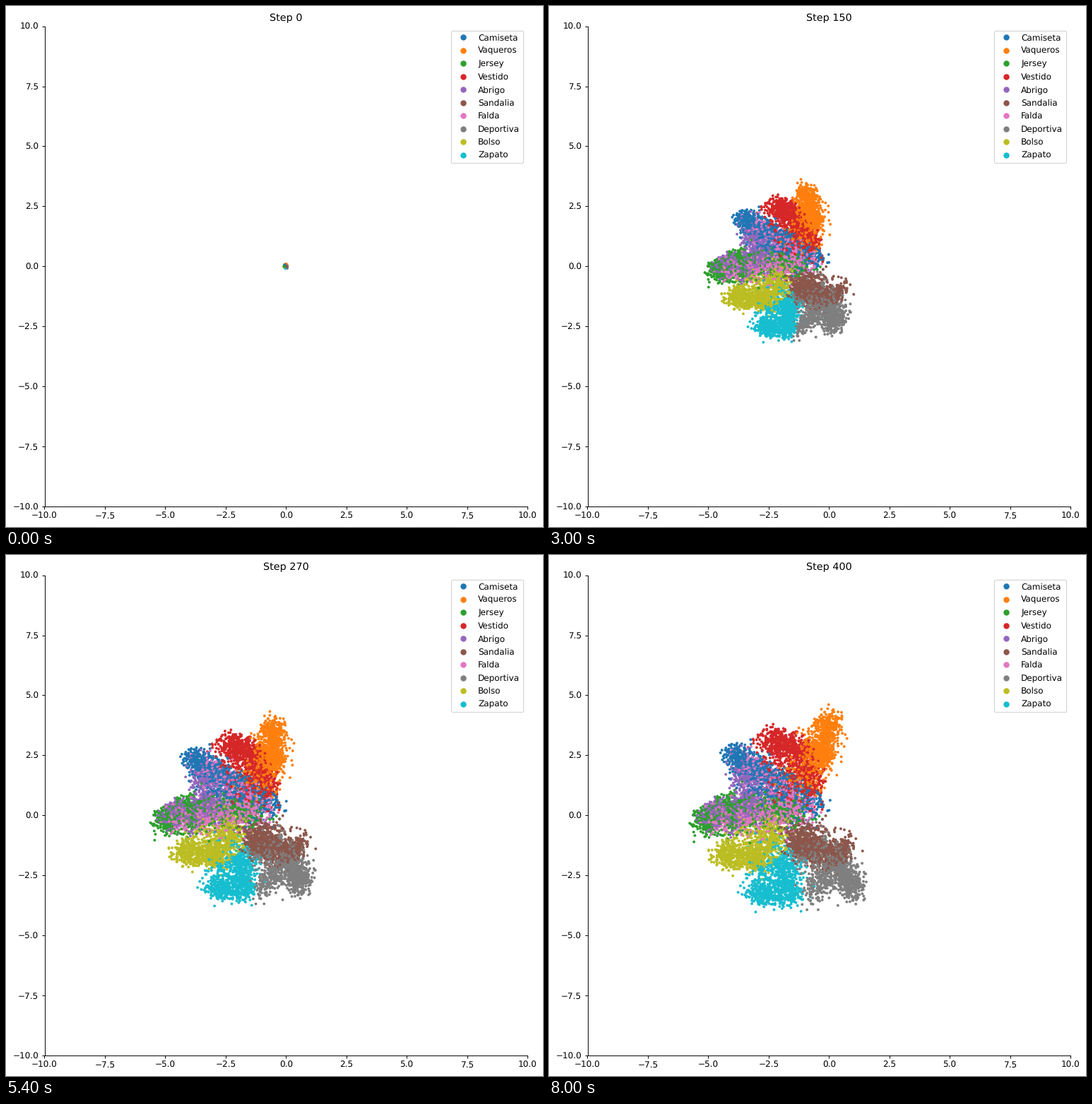
Animation, 760 px wide and 737 px high, one loop 8200 ms. Source, as a matplotlib script:

```python
import matplotlib.pyplot as plt
import numpy as np
from matplotlib.animation import FuncAnimation

W, H, DPI = 760, 737, 72          # at 72 dpi one point is one pixel
FRAMES, INTERVAL, STEP = 41, 200, 10
PER_CLASS, WIDTH = 1000, 0.29
MIDDLE = np.array([-1.9, -0.1])

plt.rcParams.update({
    "font.family": "DejaVu Sans",
    "font.size": 12,
    "text.hinting": "none",
    "axes.linewidth": 0.96,
    "xtick.major.width": 0.96, "ytick.major.width": 0.96,
    "xtick.major.size": 4.2, "ytick.major.size": 4.2,
    "xtick.major.pad": 4.2, "ytick.major.pad": 4.2,
    "patch.linewidth": 1.2,
})

# The spine of each class cloud at the end of training
SPINES = {
    "Camiseta": [(-3.9, 2.5), (-2.4, 1.6), (-0.4, 0.3)],
    "Vaqueros": [(0.0, 4.0), (-0.3, 2.2), (-0.8, 3.0)],
    "Jersey": [(-5.2, -0.3), (-3.9, 0.5), (-1.2, 0.0)],
    "Vestido": [(-2.5, 3.2), (-1.2, 2.8), (-0.6, 0.9)],
    "Abrigo": [(-5.0, 0.0), (-3.2, 0.3), (-3.7, 2.3)],
    "Sandalia": [(-1.3, -1.0), (-0.2, -1.8), (0.8, -1.3)],
    "Falda": [(-4.8, -0.1), (-0.9, 0.2), (-3.6, 2.5)],
    "Deportiva": [(1.0, -3.1), (0.4, -2.0), (-0.8, -3.4)],
    "Bolso": [(-4.5, -1.6), (-2.9, -1.9), (-2.2, -0.5)],
    "Zapato": [(-3.1, -3.2), (-1.5, -3.3), (-2.0, -2.0)],
}

rng = np.random.default_rng(7)


def cloud(spine):
    """Points around a spine; some stray wider and towards the middle."""
    t = 2 * rng.random(PER_CLASS) ** 1.5
    core = np.column_stack([np.interp(t, range(3), v) for v in zip(*spine)])
    stray = rng.random(PER_CLASS) < 0.35
    pull = np.where(stray, rng.uniform(0.05, 0.5, PER_CLASS), 0)
    core += (MIDDLE - core) * pull[:, None]
    r = WIDTH * np.sqrt(-2 * np.log(1 - 0.92 * rng.random(PER_CLASS)))
    r *= np.where(stray, 1.7, 1)
    a = rng.uniform(0, 2 * np.pi, PER_CLASS)
    return core + np.column_stack([r * np.cos(a), r * np.sin(a)])


palette = plt.get_cmap("tab10").colors
order = rng.permutation(PER_CLASS * len(SPINES))
X, Y = np.vstack([cloud(s) for s in SPINES.values()])[order].T
colors = np.repeat(palette, PER_CLASS, axis=0)[order]

# While training, the right-hand tips still lean to the left
lean = np.abs(Y) ** 1.5 / (1 + np.exp(-2.5 * (X + 1.2)))


def grow(u, rate, power):
    """Fast start, slow finish, from a tiny seed at 0 to full size at 1."""
    ease = (1 - np.exp(-(rate * u) ** power)) / (1 - np.exp(-rate ** power))
    return 0.02 + 0.98 * ease


def positions(step):
    u = step / (STEP * (FRAMES - 1))
    gx, gy = grow(u, 7.65, 0.7), grow(u, 3.9, 0.85)
    x = gx * (X - 0.22 * (1 - u) * lean) + 0.04 * (1 - gx)
    return np.column_stack([x, gy * Y])


fig = plt.figure(figsize=(W / DPI, H / DPI), dpi=DPI, facecolor="white")
ax = fig.add_axes([54.5 / W, 29.2 / H, 683.5 / W, 679.2 / H])
ax.set(xlim=(-10, 10), ylim=(-10, 10))
ax.spines[["top", "right"]].set_visible(False)
title = ax.set_title("Step 0", fontsize=14.4, pad=7.2)

dots = ax.scatter(*positions(0).T, s=15, c=colors, linewidths=0)
for label, color in zip(SPINES, palette):
    ax.plot([], [], "o", color=color, ms=7.2, mew=1.2, label=label)
ax.legend(loc="upper right", labelspacing=0.57)


def update(i):
    title.set_text(f"Step {i * STEP}")
    dots.set_offsets(positions(i * STEP))
    return dots, title


anim = FuncAnimation(fig, update, frames=FRAMES, interval=INTERVAL,
                     repeat=True, blit=False)
plt.show()
```
